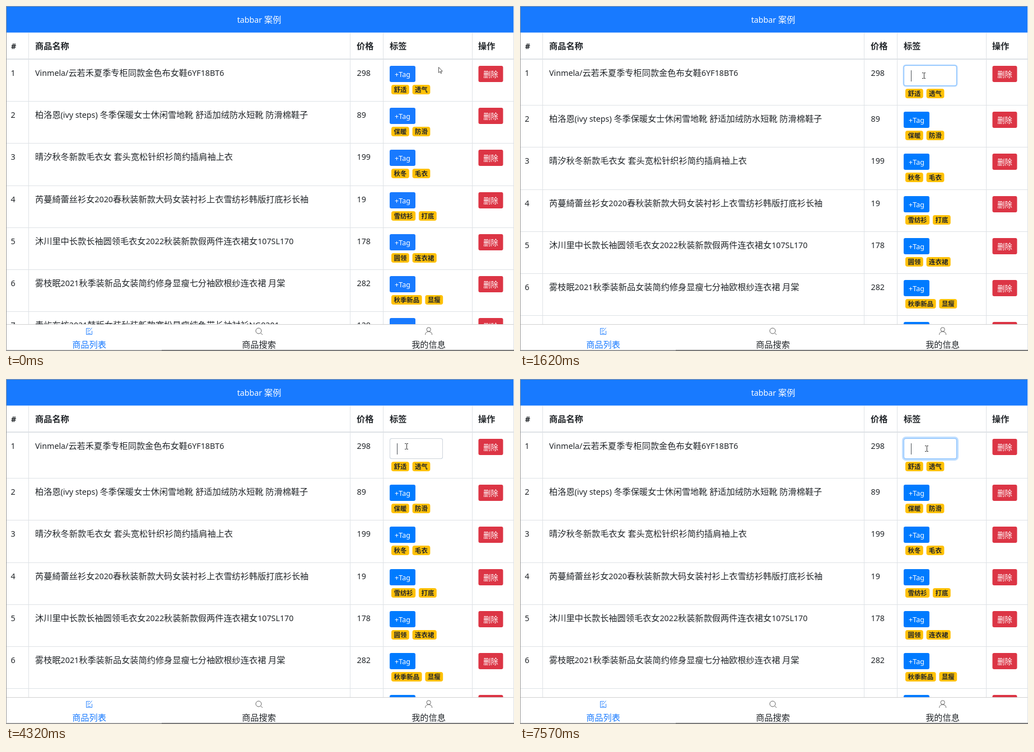
These frames come from a looping animation (907x617 px, 8000 ms). An HTML page with a canvas:

```html
<!DOCTYPE html>
<html lang="zh-CN">
<head>
<meta charset="utf-8">
<title>tabbar 案例</title>
<style>
html, body { margin: 0; width: 100%; height: 100%; overflow: hidden; background: #fff; }
canvas { display: block; }
</style>
</head>
<body>
<canvas id="stage" width="907" height="617"></canvas>
<script>
const ctx = document.getElementById('stage').getContext('2d');
const LOOP = 8000;
const W = 907, H = 617;
const BLUE = '#187aff', INK = '#212529', LINE = '#dee2e6';
const HAN = '"Noto Sans CJK SC", "Noto Sans CJK JP", sans-serif';
const LATIN = '"Noto Sans", "Open Sans", sans-serif';
const SIZE = 15.2, PITCH = 75.22;

const goods = [
  ['Vinmela/云若禾夏季专柜同款金色布女鞋6YF18BT6', 298, ['舒适', '透气']],
  ['柏洛恩(ivy steps) 冬季保暖女士休闲雪地靴 舒适加绒防水短靴 防滑棉鞋子', 89, ['保暖', '防滑']],
  ['晴汐秋冬新款毛衣女 套头宽松针织衫简约插肩袖上衣', 199, ['秋冬', '毛衣']],
  ['芮蔓綺蕾丝衫女2020春秋装新款大码女装衬衫上衣雪纺衫韩版打底衫长袖', 19, ['雪纺衫', '打底']],
  ['沐川里中长款长袖圆领毛衣女2022秋装新款假两件连衣裙女107SL170', 178, ['圆领', '连衣裙']],
  ['雾枝眠2021秋季装新品女装简约修身显瘦七分袖欧根纱连衣裙 月棠', 282, ['秋季新品', '显瘦']],
  ['青屿布坊2021韩版女装秋装新款宽松显瘦纯色带长袖衬衫NG8201', 128, ['韩版', '纯色']]
];

// Each step: start time, x, y, shape
const pointer = [
  [0, 772, 109, 'arrow'], [530, 763, 115, 'arrow'], [650, 752, 121, 'arrow'],
  [800, 727, 122, 'arrow'], [920, 701, 123, 'arrow'], [1070, 721, 124, 'beam'],
  [1890, 725, 118, 'beam'], [2010, 732, 106, 'arrow'], [2130, 737, 96, 'arrow'],
  [2280, 742, 92, 'arrow'], [2400, 746, 88, 'arrow'], [3470, 747, 96, 'arrow'],
  [3620, 740, 107, 'arrow'], [3770, 718, 118, 'arrow'], [3920, 715, 120, 'beam'],
  [4590, 721, 122, 'beam'], [4710, 726, 124, 'beam']
];
// Each step: start time, mode, focus ring width
const modes = [
  [0, 'idle', 0], [1070, 'hover', 0], [1470, 'press', 1.8], [1620, 'edit', 1.5],
  [1740, 'edit', 3], [3200, 'idle', 0], [3920, 'hover', 0], [4320, 'edit', 0],
  [4440, 'edit', 1], [4590, 'edit', 2], [4710, 'edit', 3]
];
const typed = [[0, ''], [5410, '12'], [5530, '123'], [6550, '']];
const caret = [[0, 1], [2130, 0], [2520, 1], [4320, 1], [4850, 0], [5410, 1],
  [6120, 0], [6550, 1], [7010, 0], [7570, 1]];

const at = (steps, t) => steps.filter(s => s[0] <= t).pop();

function runs(str, size, weight) {
  return (str.match(/[\u2e80-\uffff]+|[^\u2e80-\uffff]+/g) || []).map(part => {
    const han = part.charCodeAt(0) > 0x2e7f;
    const font = `${weight} ${han ? size : size * 0.94}px ${han ? HAN : LATIN}`;
    ctx.font = font;
    return { part, font, width: ctx.measureText(part).width };
  });
}

function text(str, x, y, { size = SIZE, weight = 400, color = INK, center = false } = {}) {
  const list = runs(String(str), size, weight);
  const width = list.reduce((sum, r) => sum + r.width, 0);
  if (center) x -= width / 2;
  ctx.fillStyle = color;
  for (const r of list) {
    ctx.font = r.font;
    ctx.fillText(r.part, x, y);
    x += r.width;
  }
}

function rect(x, y, w, h, color) {
  ctx.fillStyle = color;
  ctx.fillRect(x, y, w, h);
}

function box(x, y, w, h, r, color) {
  ctx.fillStyle = color;
  ctx.beginPath();
  ctx.roundRect(x, y, w, h, r);
  ctx.fill();
}

function path(d, color, width = 1) {
  ctx.strokeStyle = color;
  ctx.lineWidth = width;
  ctx.stroke(new Path2D(d));
}

function button(x, y, w, label, color) {
  box(x, y, w, 29, 3, color);
  text(label, x + w / 2, y + 20, { size: 13.3, color: '#fff', center: true });
}

function badges(tags, y) {
  let x = 688;
  for (const tag of tags) {
    const w = tag.length * 11.4 + 9;
    box(x, y, w, 17, 3.8, '#ffc107');
    text(tag, x + w / 2, y + 13, { size: 11.4, weight: 700, center: true });
    x += w + 5.8;
  }
}

function input(ring, t) {
  box(685 - ring, 106 - ring, 95 + ring * 2, 37 + ring * 2, 4 + ring, '#bfdeff');
  box(685, 106, 95, 37, 4, ring ? '#80bdff' : '#ced4da');
  box(686, 107, 93, 35, 3, '#fff');
  const value = at(typed, t)[1];
  text(value, 697.5, 131, { color: '#495057' });
  if (at(caret, t)[1]) rect(698 + Math.round(value.length * 8.1), 115, 1, 20, '#495057');
}

function tagCell(y, mode, ring, t) {
  if (mode === 'edit') return input(ring, t);
  const color = { hover: '#0069d9', press: '#0062cc' }[mode] || (t < 1620 ? BLUE : '#007bff');
  if (ring) box(685 - ring, y - ring, 46 + ring * 2, 29 + ring * 2, 3 + ring, '#a9cfff');
  button(685, y, 46, '+Tag', color);
}

function table(t) {
  const [, mode, ring] = at(modes, t);
  const grow = mode === 'edit' ? 7 : 0;
  const bold = { weight: 700 };
  [['#', 9], ['商品名称', 52], ['价格', 626], ['标签', 685], ['操作', 843]]
    .forEach(([label, x]) => text(label, x, 77, bold));
  for (const x of [40, 614, 673, 832]) rect(x, 48, 1, 521, LINE);
  rect(0, 94, W, 2, LINE);
  goods.forEach(([name, price, tags], i) => {
    const first = i === 0;
    const y = Math.round(95 + i * PITCH) + (first ? 0 : grow);
    if (!first) rect(0, y, W, 1, LINE);
    text(i + 1, 8.5, y + 30);
    text(name, 52, y + 30);
    text(price, 626.5, y + 30);
    tagCell(y + 12, first ? mode : 'idle', first ? ring : 0, t);
    badges(tags, y + 46 + (first ? grow : 0));
    button(843.5, y + 12, 44, '删除', '#dc3545');
  });
}

function tabs() {
  rect(0, 569, W, 48, '#fff');
  rect(0, 569, W, 1, '#d0d0d0');
  [['商品列表', 148.5, BLUE], ['商品搜索', 451.5, INK], ['我的信息', 754.5, INK]]
    .forEach(([label, x, color]) => text(label, x, 611, { color, center: true }));
  path('M150 576.5H143.5V587.5H153.5V581M147.5 582.5L153.5 575.5M145.5 579.5H148M145.5 582.5H147M145.5 585.5H151', BLUE, 0.9);
  path('M456 581a5 5 0 1 0-10 0a5 5 0 1 0 10 0M454.8 584.6L458 588', '#555', 0.9);
  path('M758.3 578.5a3.6 3.6 0 1 0-7.2 0a3.6 3.6 0 1 0 7.2 0M748.7 588c0-3.8 2.4-5.5 6-5.5s6 1.7 6 5.5', '#555', 0.9);
}

function windowEdge() {
  rect(0, 0, W, 1, '#999');
  rect(0, 0, 1, H, '#999');
  rect(906, 0, 1, H, LINE);
  rect(0, 615, 278, 1, '#aaa');
  rect(278, 615, W - 278, 1, '#666');
  rect(0, 616, W, 1, '#888');
}

function cursor(t) {
  const [, x, y, shape] = at(pointer, t);
  const mode = at(modes, t)[1];
  ctx.save();
  ctx.translate(x, y);
  if (shape === 'beam') {
    const dark = mode === 'edit';
    path('M-3 -4.5H-.5M.5 -4.5H3M-3 5.5H-.5M.5 5.5H3M.5 -4V5', dark ? '#333' : '#e08a4a');
  } else {
    const arrow = new Path2D('M.5 .5V10.3L2.8 8.2L4.4 11.7L5.8 11L4.3 7.7H7.3Z');
    ctx.fillStyle = '#fff';
    ctx.fill(arrow);
    ctx.strokeStyle = '#444';
    ctx.lineWidth = 0.9;
    ctx.stroke(arrow);
  }
  ctx.restore();
}

function draw(t) {
  rect(0, 0, W, H, '#fff');
  table(t);
  rect(0, 0, W, 47.5, BLUE);
  text('tabbar 案例', 452, 30, { color: '#fff', center: true });
  tabs();
  windowEdge();
  cursor(t);
}

const start = performance.now();
function tick() {
  draw((performance.now() - start) % LOOP);
  requestAnimationFrame(tick);
}
tick();
</script>
</body>
</html>
```
